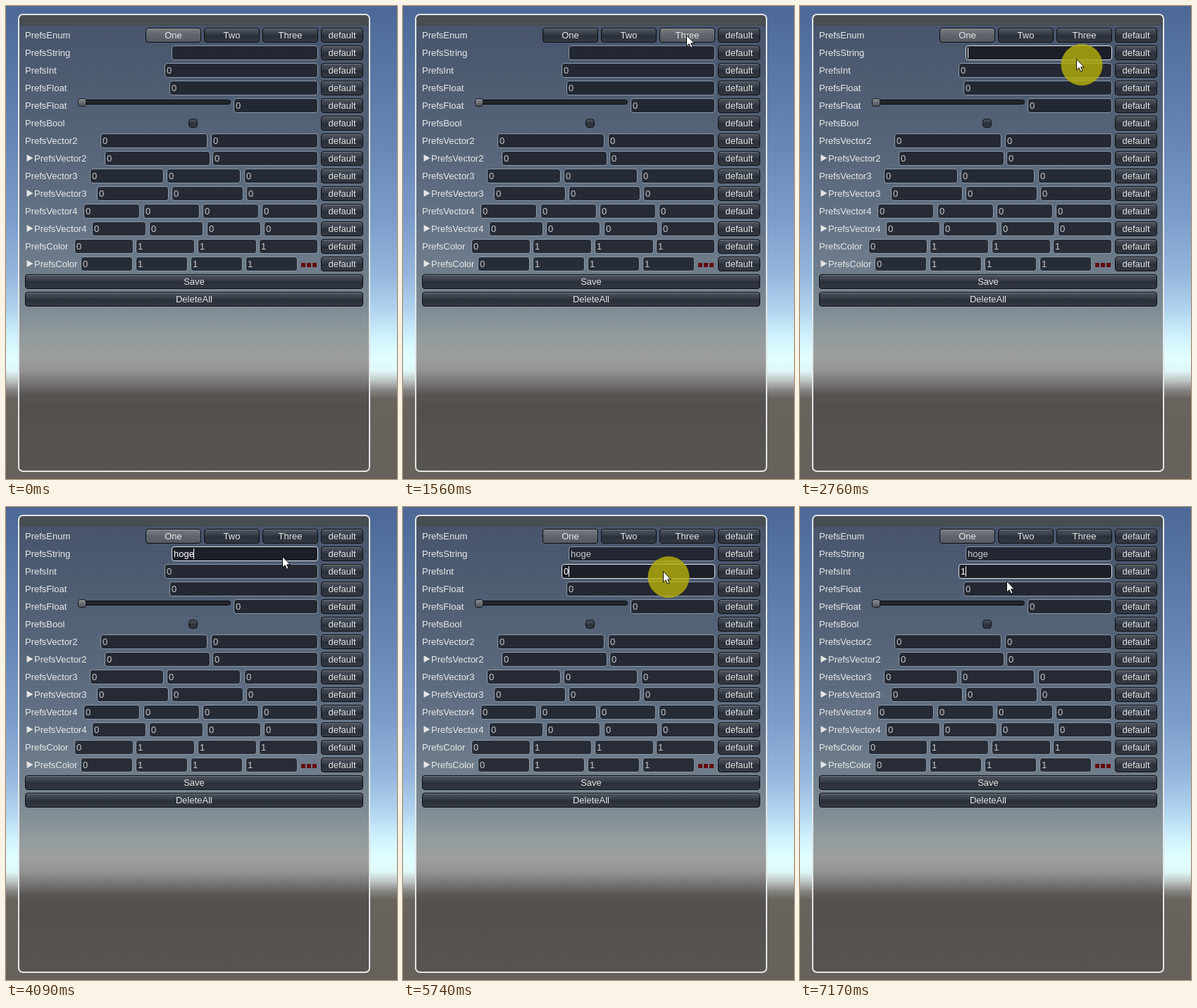
These frames come from a looping animation (555 px wide and 672 px high, 8 s). An HTML page:

```html
<!DOCTYPE html>
<html lang="en">
<head>
<meta charset="utf-8">
<title>Preferences window</title>
<style>
  html, body { margin: 0; width: 100%; height: 100%; overflow: hidden; background: #67615b; }
  svg { display: block; width: 555px; height: 672px; }
  text { font: 13px "Liberation Sans", Arial, sans-serif; fill: #e9e9e9; white-space: pre; }
  .mid { text-anchor: middle; }
  .btn rect { fill: url(#dark); stroke: #0b0d11; }
  .btn path { stroke: #fff; stroke-opacity: .2; }
  .btn.hover rect { fill: url(#hover); stroke: #20242a; }
  .btn.on rect { fill: url(#lit); }
  .btn.down rect { fill: url(#dark); stroke: #8b939d; }
  .field rect { fill: #1c2029; fill-opacity: .86; stroke: #8c98a6; }
  .field text { fill: #c9c9c9; }
  .field.focus rect { fill: #181b22; fill-opacity: .92; stroke: #dfe3e7; }
  .field.focus text { fill: #fff; }
</style>
</head>
<body>
<svg id="stage" viewBox="0 0 555 672" xmlns="http://www.w3.org/2000/svg">
  <defs></defs>
</svg>
<script>
const LOOP = 8000;
const stage = document.getElementById('stage');
const defs = stage.querySelector('defs');

function add(parent, tag, attrs = {}, text) {
  const el = document.createElementNS('http://www.w3.org/2000/svg', tag);
  for (const key in attrs) el.setAttribute(key, attrs[key]);
  if (text !== undefined) el.textContent = text;
  parent.append(el);
  return el;
}

// stops: "offset colour" pairs; with a height the offsets are pixels
function gradient(id, height, stops) {
  const box = height ? { gradientUnits: 'userSpaceOnUse', y2: height } : { y2: 1 };
  const g = add(defs, 'linearGradient', { id, x1: 0, y1: 0, x2: 0, ...box });
  for (const [at, color] of stops)
    add(g, 'stop', { offset: at / (height || 1), 'stop-color': color });
}

gradient('sky', 672, [[0, '#4d6896'], [100, '#5a77a6'], [200, '#6887b7'], [300, '#7b9cca'],
  [380, '#94b6dc'], [430, '#afd3ef'], [470, '#d0f2fd'], [500, '#e2ffff'], [518, '#e0f8f8'],
  [532, '#bfc6c6'], [546, '#868482'], [558, '#69635e'], [672, '#67615b']]);
gradient('glass', 672, [[0, '#465268'], [60, '#4a586f'], [200, '#566579'], [300, '#627184'],
  [380, '#707e8c'], [430, '#7f8b94'], [470, '#929b9d'], [500, '#9c9f9e'], [518, '#929392'],
  [535, '#777574'], [552, '#585452'], [570, '#534f4d'], [672, '#595551']]);
gradient('dark', 0, [[0, '#505763'], [.35, '#3b414c'], [.55, '#2a2f38'], [1, '#343a44']]);
gradient('hover', 0, [[0, '#6f7682'], [.5, '#4a515d'], [1, '#565d69']]);
gradient('lit', 0, [[0, '#7c7e84'], [.5, '#60646c'], [1, '#555a63']]);
gradient('knob', 0, [[0, '#8d9094'], [1, '#4c5056']]);

const box = (parent, x, y, w, h, rx, more) =>
  add(parent, 'rect', { x: x + .5, y: y + .5, width: w - 1, height: h - 1, rx, ...more });

const rowY = i => 31 + 25 * i;
const buttons = [];

function button(row, x1, x2, label) {
  const y = rowY(row);
  const el = add(stage, 'g', { class: 'btn' });
  box(el, x1, y, x2 - x1, 21, 3.5);
  add(el, 'path', { d: `M${x1 + 3} ${y + 1.5}H${x2 - 3}` });
  add(el, 'text', { x: (x1 + x2) / 2, y: y + 15, class: 'mid' }, label);
  const b = { el, x1, x2, y };
  buttons.push(b);
  return b;
}

function field(row, x1, x2, value) {
  const el = add(stage, 'g', { class: 'field' });
  box(el, x1, rowY(row), x2 - x1, 21, 3.5);
  return { el, text: add(el, 'text', { x: x1 + 3, y: rowY(row) + 15 }, value) };
}

// Window
add(stage, 'rect', { width: 555, height: 672, fill: 'url(#sky)' });
add(stage, 'rect', { x: 18, y: 12, width: 498, height: 649, rx: 6, fill: 'url(#glass)' });
add(stage, 'path', { d: 'M19 28V18Q19 13 24 13H510Q515 13 515 18V28Z', fill: '#484d52' });
add(stage, 'rect', { x: 18, y: 12, width: 498, height: 649, rx: 6, fill: 'none', stroke: '#e3e6e8', 'stroke-width': 2 });

// Rows: label, first field values, left edges, field width; a leading ">" marks a foldout
const rows = [
  ['PrefsEnum'],
  ['PrefsString', '', [235], 208],
  ['PrefsInt', '0', [225], 218],
  ['PrefsFloat', '0', [232], 211],
  ['PrefsFloat', '0', [323], 120],
  ['PrefsBool'],
  ['PrefsVector2', '0', [134, 291], 152],
  ['>PrefsVector2', '0', [140, 293], 150],
  ['PrefsVector3', '0', [119, 228, 338], 105],
  ['>PrefsVector3', '0', [129, 235, 341], 102],
  ['PrefsVector4', '0', [110, 195, 279, 363], 80],
  ['>PrefsVector4', '0', [122, 203, 285, 366], 77],
  ['PrefsColor', '0111', [97, 184, 272, 359], 84],
  ['>PrefsColor', '0111', [106, 184, 262, 340], 74],
];
const fields = rows.map(([label, values, lefts = [], width], i) => {
  const y = rowY(i), folded = label[0] === '>';
  if (folded) add(stage, 'path', { d: `M29.5 ${y + 5}L38.5 ${y + 10}L29.5 ${y + 15}Z`, fill: '#e6e6e6' });
  add(stage, 'text', { x: folded ? 40 : 27, y: y + 15 }, folded ? label.slice(1) : label);
  const made = lefts.map((x, k) => field(i, x, x + width, values[k % values.length]));
  button(i, 447, 507, 'default');
  return made;
});
const [stringField] = fields[1], [intField] = fields[2];
const options = [button(0, 198, 277, 'One'), button(0, 281, 360, 'Two'), button(0, 364, 443, 'Three')];
button(14, 27, 507, 'Save');
button(15, 27, 507, 'DeleteAll');

// Slider, toggle, swatches
box(stage, 102, 133, 217, 7, 3, { fill: '#22262e', stroke: '#08090c' });
box(stage, 102, 131, 12, 12, 3, { fill: 'url(#knob)', stroke: '#15171b' });
box(stage, 259, 160, 13, 13, 4, { fill: 'url(#dark)', stroke: '#0d0f13' });
for (const x of [419, 427, 435])
  add(stage, 'rect', { x, y: 365, width: 6, height: 6, fill: '#640b0e' });

const caret = add(stage, 'rect', { width: 1, height: 15, fill: '#fff' });
const halo = add(stage, 'circle', { r: 29.5, fill: '#b4ae0a', 'fill-opacity': .82 });
const pointer = add(stage, 'path', {
  d: 'M.5 .5V16L4.1 12.7L6.6 18.2L9 17.1L6.6 11.8H11.3Z',
  fill: '#fff', stroke: '#000', 'stroke-width': .9,
});

// Pointer moves: start, end, steps, target x, y
const entry = [504, 600];
const moves = [
  [180, 950, 11, 339, 41],
  [1110, 1320, 4, 400, 41],
  [1490, 2140, 9, 470, 41],
  [2340, 2760, 7, 392, 75],
  [2920, 3090, 3, 392, 70],
  [5020, 5190, 3, 397, 67],
  [5360, 5740, 6, 369, 91],
  [6310, 6860, 8, 190, 88],
  [7030, 7170, 3, 293, 105],
];
const presses = [[950, 1110], [1320, 1490], [2240, 2340], [2760, 2920], [5740, 5910]];
const selected = [[0, 0], [1110, 1], [1490, 2], [2340, 0]];
const typed = [[0, ''], [3790, 'h'], [3860, 'ho'], [4090, 'hoge']];

const latest = (table, t) => table.reduce((v, [at, value]) => t >= at ? value : v, table[0][1]);
const ease = u => u * u * (3 - 2 * u);

function pointerAt(t) {
  let [x, y] = entry;
  for (const [start, end, steps, tx, ty] of moves) {
    if (t < start) break;
    const k = Math.min(steps - 1, Math.floor((t - start) / (end - start) * (steps - 1) + 1e-6));
    const e = ease((k + 1) / steps);
    x += (tx - x) * e;
    y += (ty - y) * e;
  }
  return [Math.round(x), Math.round(y)];
}

function setText(node, value) {
  if (node.textContent !== value) node.textContent = value;
}

function draw(t) {
  const [x, y] = pointerAt(t);
  const shown = t >= 180;
  const down = presses.some(([a, b]) => t >= a && t < b);
  pointer.setAttribute('transform', `translate(${x} ${y})`);
  pointer.style.display = shown ? '' : 'none';
  halo.setAttribute('cx', x + 8);
  halo.setAttribute('cy', y + 8.5);
  halo.style.display = down ? '' : 'none';

  const choice = options[latest(selected, t)];
  for (const b of buttons) {
    const over = shown && x >= b.x1 && x < b.x2 && y >= b.y && y < b.y + 21;
    const state = b === choice ? 'on' : over ? (down ? 'down' : 'hover') : '';
    b.el.setAttribute('class', 'btn ' + state);
  }

  const inString = t >= 2760 && t < 5740, inInt = t >= 5740;
  stringField.el.classList.toggle('focus', inString);
  intField.el.classList.toggle('focus', inInt);
  setText(stringField.text, latest(typed, t));
  setText(intField.text, t >= 7100 ? '1' : '0');

  const active = inInt ? intField.text : stringField.text;
  caret.style.display = inInt || (inString && t < 5020) ? '' : 'none';
  const width = active.textContent ? active.getComputedTextLength() : 0;
  caret.setAttribute('x', Math.floor(+active.getAttribute('x') + width));
  caret.setAttribute('y', active.getAttribute('y') - 12);
}

const begin = performance.now();
function tick() {
  draw((performance.now() - begin) % LOOP);
  requestAnimationFrame(tick);
}
tick();
</script>
</body>
</html>
```
